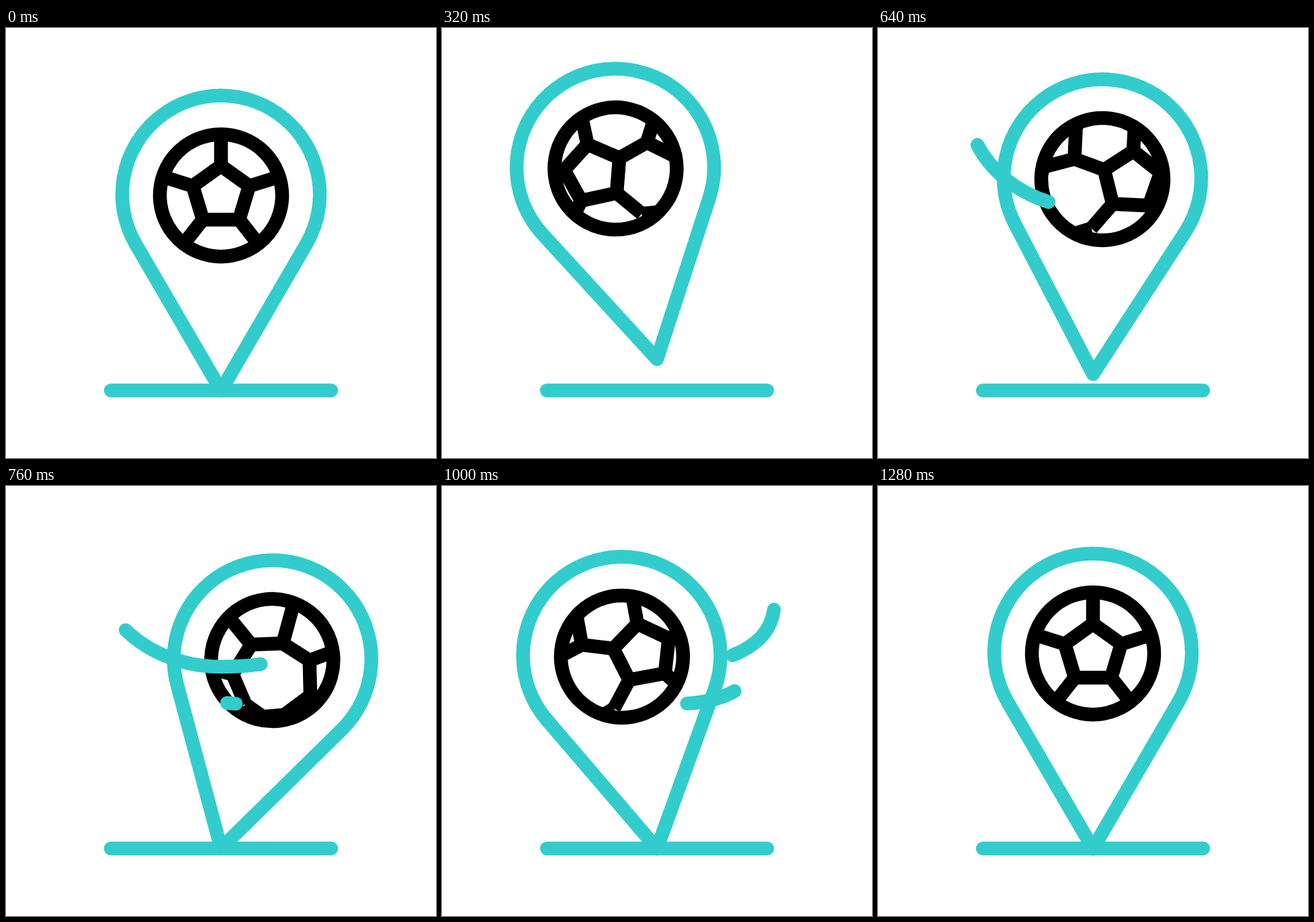
These frames come from a looping animation (640 px wide and 640 px high, 2400 ms). An HTML page:

```html
<!DOCTYPE html>
<html lang="en">
<head>
<meta charset="utf-8">
<title>Football pin</title>
<style>
html, body { margin: 0; height: 100%; overflow: hidden; background: #fff; }
svg { display: block; width: 100vw; height: 100vh; }
path, circle { fill: none; stroke: #3cc; stroke-width: 20.5; }
.round { stroke-linecap: round; stroke-linejoin: round; }
#ball path, #ball circle, #panel path { stroke: #000; }
</style>
</head>
<body>
<svg viewBox="0 0 640 640">
  <defs>
    <clipPath id="disc"><circle r="92"/></clipPath>
    <g id="panel">
      <path d="M0-44L42-14L27 36H-27L-42-14Z"/>
      <path d="M0-44V-100M42-14L87-28M27 36L57 74M-27 36L-57 74M-42-14L-87-28"/>
    </g>
  </defs>
  <path class="round" d="M156 539.5H484"/>
  <g id="pin">
    <path class="round" d="M0 0L-127.3-218.5A147 147 0 1 1 127.3-218.5Z"/>
    <g id="ball" transform="translate(0 -290.4)">
      <g clip-path="url(#disc)">
        <g id="pattern">
          <use href="#panel"/>
          <use href="#panel" x="-174"/>
          <path d="M-87-28V-100M-57 74L-87 85L-117 74"/>
          <path stroke-linejoin="round" d="M104-58L87-28L121-1M57 74L90 78"/>
        </g>
      </g>
      <circle r="91"/>
    </g>
  </g>
  <path id="long" class="round" pathLength="1" d="M148 174C178 232 245 269 320 269C410 269 486 246 494 184"/>
  <path id="short" class="round" pathLength="1" d="M329 323C380 328 438 317 464 280"/>
</svg>
<script>
const LOOP = 2400;
const el = id => document.getElementById(id);

// Eased value at time t through [time, value] keys
function track(keys, t) {
  const i = keys.findIndex(k => k[0] > t);
  if (i < 0) return keys[keys.length - 1][1];
  if (i === 0) return keys[0][1];
  const [t0, a] = keys[i - 1], [t1, b] = keys[i];
  const s = (t - t0) / (t1 - t0);
  return a + (b - a) * s * s * (3 - 2 * s);
}

const tilt = [[0, 0], [468, -16], [774, 15.4], [1035, -11.6], [1260, 0]];
const lift = [[0, 0], [468, 61], [774, 0]];
const roll = [[0, 0], [433, -39.8], [800, 100], [1133, -5], [1280, 0]];

function trim(path, t, head, tail) {
  const end = track([[head[0], 0], [head[1], 1]], t);
  const start = track([[tail[0], 0], [tail[1], 1]], t);
  path.style.visibility = end > start ? "visible" : "hidden";
  path.style.strokeDasharray = `${Math.max(end - start, 0)} 3`;
  path.style.strokeDashoffset = -start;
}

function draw(t) {
  el("pin").setAttribute("transform", `translate(320 ${539.6 - track(lift, t)}) rotate(${track(tilt, t)})`);
  el("pattern").setAttribute("transform", `translate(${track(roll, t)} 0)`);
  trim(el("long"), t, [414, 1000], [650, 1160]);
  trim(el("short"), t, [670, 1167], [870, 1280]);
}

const begin = performance.now();
function tick() {
  draw((performance.now() - begin) % LOOP);
  requestAnimationFrame(tick);
}
tick();
</script>
</body>
</html>
```
